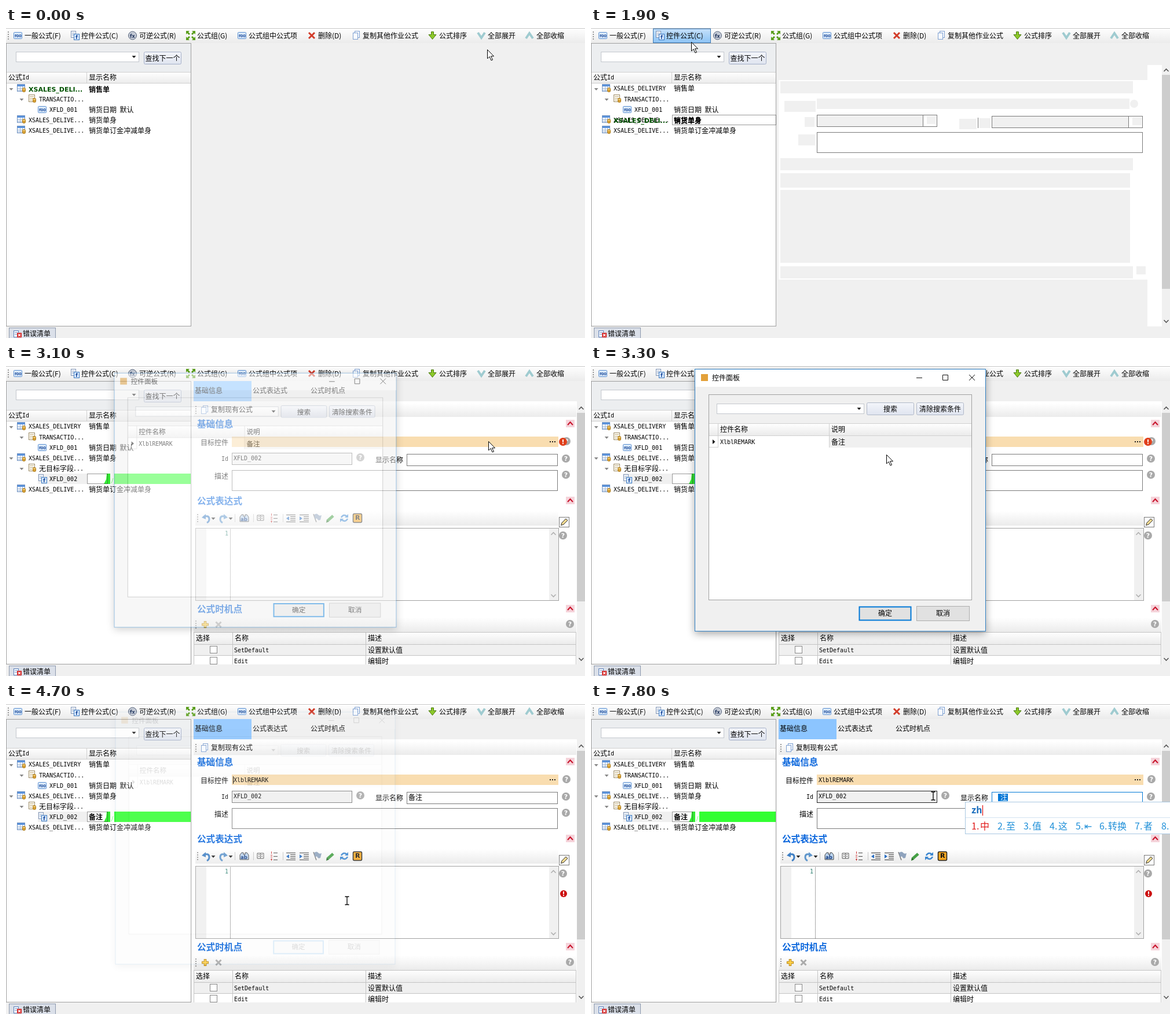
Animation of 1000 by 536 pixels, one loop 8 s. Source, as an HTML page:

```html
<!DOCTYPE html>
<html lang="zh-CN">
<head>
<meta charset="utf-8">
<title>公式编辑</title>
<style>
html, body { margin: 0; width: 100%; height: 100%; overflow: hidden; background: #f0f0f0; }
svg { display: block; width: 100%; height: 100%; }
text { font: 12px "Noto Sans CJK SC", "Noto Sans CJK", sans-serif; white-space: pre; }
.m { font: 10px "DejaVu Sans Mono", monospace; }
.b { font-weight: 700; }
.v { font: 700 11px "DejaVu Sans", sans-serif; }
.h { font-size: 15.6px; font-weight: 700; }
.ime { font-size: 16px; }
</style>
</head>
<body>
<svg id="stage" viewBox="0 0 1000 536" preserveAspectRatio="none" xmlns="http://www.w3.org/2000/svg"></svg>
<script>
const LOOP = 8000, STEP = 100;

// Drop from the middle line to the baseline, per text class
const drop = { m: 4, v: 4, h: 6, ime: 6, 'ime b': 5 };

// Drawing helpers: each returns SVG markup
const rect = (x, y, w, h, fill = 'none', line, extra = '') => line
  ? `<rect x="${x + .5}" y="${y + .5}" width="${w - 1}" height="${h - 1}" fill="${fill}" stroke="${line}" ${extra}/>`
  : `<rect x="${x}" y="${y}" width="${w}" height="${h}" fill="${fill}" ${extra}/>`;
const text = (x, mid, s, cls = '', fill = '#000', size = 0) =>
  `<text x="${x}" y="${Math.round(mid + (drop[cls] || 4.6))}" class="${cls}" fill="${fill}"${size ? ` style="font-size:${size}px"` : ''}>${s}</text>`;
const mono = (x, mid, s, fill) => text(x, mid, s, 'm', fill);
const path = (d, line, w = 1, fill = 'none', dash = 'none') =>
  `<path d="${d}" stroke="${line}" stroke-width="${w}" fill="${fill}" stroke-dasharray="${dash}"/>`;
const shape = (d, fill) => path(d, 'none', 0, fill);
const disc = (x, y, r, fill, line = 'none') =>
  `<circle cx="${x}" cy="${y}" r="${r}" fill="${fill}" stroke="${line}"/>`;
const at = (x, y, body) => `<g transform="translate(${x} ${y})">${body}</g>`;
const during = (from, to, body) => `<g data-from="${from}" data-to="${to}">${body}</g>`;
const dots = (x, y, w, h) => rect(x, y, w, h, 'none', '#333', 'stroke-dasharray="1 1"');
const down = (x, y, fill = '#222') => shape(`M${x - 3.5} ${y - 2}h7l-3.5 4z`, fill);
const grip = (x, y) => path(`M${x} ${y}v14`, '#999', 2, 'none', '2 2');
const sep = x => path(`M${x}.5 256v14`, '#c4c4c4');
const badge = (x, y, r, fill, mark) =>
  disc(x, y, r, fill) + `<text x="${x}" y="${y + 4}" text-anchor="middle" fill="#fff" class="v">${mark}</text>`;
const help = (x, y) => badge(x, y, 7, '#a9a9a9', '?');

// Icons
const fx = (x, y) => at(x, y, rect(0, 0, 15, 12, '#dcebfb', '#5b8fd0', 'rx="1"') + text(2, 5, 'f00', 'v', '#1f4e9c', 6.5));
const page = (x, y, line = '#7f94b5') => rect(x, y, 9, 12, '#f8fbff', line);
const pages = (x, y) => at(x, y, page(3, 0, '#7d9fd0') + page(0, 3, '#7d9fd0'));
const ctrl = (x, y) => at(x, y, page(0, 0) + path('M2 3.5h5M2 5.5h5M2 7.5h4', '#a8b8d0')
  + rect(5, 5, 10, 11, '#dcecff', '#3a78c0') + text(8, 10, 'f', 'v', '#17489a', 9));
const drum = (x, y) => rect(x, y, 6, 8, '#d9a236', '#a87616', 'rx="2"') + path(`M${x + 1} ${y + 2.5}h4`, '#ffe59a');
const table = (x, y) => at(x, y, rect(0, 0, 14, 13, '#fff', '#6c8fc0') + rect(1, 1, 12, 3, '#5b93dc')
  + path('M1 7.5h12M1 10.5h12M5.5 4v8M9.5 4v8', '#9db6d8') + drum(9, 6));
const list = (x, y) => at(x, y, rect(0, 0, 11, 13, '#fffdf4', '#9b8a66') + path('M2 3.5h7M2 6.5h7M2 9.5h4', '#c0ad82') + drum(7, 6));
const cross = (x, y, r, c) => path(`M${x - r} ${y - r}L${x + r} ${y + r}M${x + r} ${y - r}L${x - r} ${y + r}`, c, 3);
const arm = (x, y, sx, sy) => `<g transform="translate(${x} ${y}) scale(${sx} ${sy})">${shape('M0 0h6l-2 2 3 3-2 2-3-3-2 2z', '#5a9e1c')}</g>`;
const fold = y => rect(967, y - 6, 15, 13, '#f5d3da') + path(`M970 ${y + 3}l4.5-5 4.5 5`, '#c8142c', 2);

const defs = `<defs>
  <linearGradient id="bar" x2="0" y2="1"><stop stop-color="#fff"/><stop offset="1" stop-color="#ebebeb"/></linearGradient>
  <linearGradient id="btn" x2="0" y2="1"><stop stop-color="#f3f5fa"/><stop offset="1" stop-color="#dfe4ef"/></linearGradient>
  <linearGradient id="hot" x2="0" y2="1"><stop stop-color="#c5e0fa"/><stop offset="1" stop-color="#8cc3f5"/></linearGradient>
  <clipPath id="view"><path d="M0 0H1000V516H0z"/></clipPath></defs>`;
const bar = (x, y, w, h) => rect(x, y, w, h, 'url(#bar)');

function toolbar() {
  return bar(0, 0, 1000, 26) + path('M0 .5H1000', '#c6c6c6') + grip(4, 6)
    + during(1300, 2100, rect(107, 1, 100, 25, 'url(#hot)', '#3c78b4'))
    + fx(13, 7) + text(32, 13.5, '一般公式(F)')
    + ctrl(112, 5) + text(130, 13.5, '控件公式(C)')
    + disc(218.5, 13, 7, '#c5cbd6', '#55627a') + text(214, 13, 'fx', 'v', '#22355c', 8) + text(230, 13.5, '可逆公式(R)')
    + arm(311, 5, 1, 1) + arm(327, 5, -1, 1) + arm(311, 21, 1, -1) + arm(327, 21, -1, -1) + text(330, 13.5, '公式组(G)')
    + fx(400, 7) + text(419, 13.5, '公式组中公式项')
    + cross(528, 13, 5, '#d23c2a') + text(539, 13.5, '删除(D)')
    + pages(599, 5) + text(616, 13.5, '复制其他作业公式')
    + path('M734.5 6.5h4v5h4.5l-6.5 8-6.5-8h4.5z', '#4a7a10', 1, '#8cc82a') + text(748, 13.5, '公式排序')
    + path('M815 8l6 9 6-9', '#9fcbd0', 4) + text(832, 13.5, '全部展开')
    + path('M898 18l6-9 6 9', '#9fcbd0', 4) + text(916, 13.5, '全部收缩');
}

const row = (y, id, name, icon = table) => icon(19, y - 8) + mono(39, y, id) + text(143, y, name);
const boldId = (y, id, x = 39) => text(x, y, id, 'v', '#005200');

function tree() {
  const late = during(2000, LOOP,
    down(9, 160, '#888') + down(27, 178, '#888') + list(39, 169) + text(57, 177, '无目标字段') + mono(116, 177, '...')
    + during(2000, 2700, boldId(195, 'XFLD_002', 75) + dots(140, 186, 180, 18))
    + during(2700, LOOP, rect(55, 186, 85, 18, '#f0f0f0') + mono(75, 195, 'XFLD_002')
      + rect(187, 186, 132, 18, '#33ff33') + shape('M174 186h6v18h-11l4-8z', '#33ee33')
      + path('M182 203l3-9', '#8f8', 1) + dots(140, 186, 36, 18))
    + during(4600, LOOP, text(143, 195.5, '备注', 'b'))
    + ctrl(56, 187) + row(213, 'XSALES_DELIVE...', '销货单订金冲减单身'));
  return rect(0, 26, 320, 490, '#fff', '#a0a0a0') + rect(1, 27, 318, 49, '#eceef0')
    + rect(17, 41, 213, 18, '#fff', '#c3c7cd') + down(221, 50)
    + rect(238, 41, 65, 22, 'url(#btn)', '#a5b0c8', 'rx="2"') + text(240.5, 52, '查找下一个')
    + bar(1, 76, 318, 20) + path('M1 76.5H319M1 95.5H319M139.5 77V95', '#d0d0d0')
    + text(4, 85.5, '公式') + mono(28, 85, 'Id') + text(143, 85.5, '显示名称')
    + down(9, 106, '#888') + table(19, 97)
    + during(0, 900, boldId(106, 'XSALES_DELI...') + text(143, 106, '销售单', 'b'))
    + during(900, LOOP, mono(39, 104, 'XSALES_DELIVERY') + text(143, 104, '销售单'))
    + down(27, 124, '#888') + list(39, 115) + mono(57, 123, 'TRANSACTIO...')
    + fx(55, 135) + mono(75, 141, 'XFLD_001') + text(143, 141, '销货日期\u00a0\u00a0默认')
    + row(159, 'XSALES_DELIVE...', '销货单身')
    + during(900, 2000, boldId(160, 'XSALES_DELI...') + text(143, 160, '销货单身', 'b') + dots(140, 150, 180, 18))
    + during(0, 2000, row(177, 'XSALES_DELIVE...', '销货单订金冲减单身'))
    + late;
}

const footer = () => rect(5, 518, 81, 20, '#dbe0e9', '#8d99ad') + page(13, 523, '#5d7fb8')
  + path('M15 526.5h5M15 529.5h5', '#7fa0d0') + rect(19, 527, 8, 8, '#d42a2a') + path('M21 529l4 4m0-4l-4 4', '#fff', 1.3)
  + text(29, 528.5, '错误清单');

function scrollbar(end) {
  return rect(986, 64, 14, 452, '#f0f0f0') + rect(986, 81, 14, end - 81, '#cdcdcd')
    + path('M989.5 75l4-4 4 4M989.5 505l4 4 4-4', '#555', 1.6);
}

function skeleton() {
  const grey = [[327, 92, 609, 21], [334, 126, 54, 19], [390, 122, 540, 18], [369, 154, 17, 17], [636, 157, 30, 18],
    [358, 184, 29, 19], [327, 225, 609, 21], [327, 251, 604, 25], [327, 280, 604, 126], [327, 412, 609, 21], [942, 412, 16, 14]];
  const box = (x, y, w, cut) => rect(x, y, w, 21, '#fff', '#7a7a7a') + rect(x + 1, y + 1, cut - x - 1, 19, '#f0f0f0')
    + path(`M${cut}.5 ${y}v20`, '#7a7a7a') + rect(cut + 7, y + 2, 16, 14, '#f0f0f0');
  return rect(324, 90, 637, 345, '#fff') + rect(961, 64, 25, 452, '#fff')
    + grey.map(g => rect(...g, '#f0f0f0')).join('') + disc(938, 131, 7, '#f0f0f0')
    + box(390, 150, 208, 573) + box(692, 152, 261, 928) + path('M668.5 155v18', '#7a7a7a') + rect(670, 156, 20, 17, '#f0f0f0')
    + rect(390, 180, 563, 36, '#fff', '#7a7a7a') + scrollbar(451);
}

function editorBar() {
  const lines = (x, flip) => path(`M${x} 257.5h16M${x + 7} 260.5h9M${x + 7} 263.5h9M${x + 7} 266.5h9M${x} 269.5h16`, '#333')
    + shape(flip ? `M${x} 260l5 3.5-5 3.5z` : `M${x + 5} 260l-5 3.5 5 3.5z`, '#2a6fc4');
  return bar(327, 251, 627, 25) + grip(331, 256)
    + path('M341 261q10-4 10 4 0 4-4 6', '#3f7fc4', 3) + shape('M338 262l7-6v9z', '#3f7fc4') + down(358, 264)
    + path('M380 261q-10-4-10 4 0 4 4 6', '#5f96cc', 3) + shape('M383 262l-7-6v9z', '#5f96cc') + down(388, 264) + sep(395)
    + path('M404 269v-8l3-4h3v3h3v-3h3l3 4v8z', '#444', 1, '#bcd4ee') + text(405, 264, 'ab', 'v', '#123a80', 8.5) + sep(427)
    + path('M434 258h5.5v9H434zM439.5 258h5.5v9h-5.5zM436 260.5h2M436 263.5h2M441 260.5h2M441 263.5h2', '#555')
    + path('M462 257.5h7M462 263.5h7M462 269.5h7', '#444')
    + path('M458.5 255v4M457 261.5h3M457 264.5h3M457 268.5h3M458.5 267v4', '#c33') + sep(478)
    + lines(484) + lines(507, true)
    + path('M531 256l5 14', '#777', 1.5) + shape('M532 257q5-3 7 0t6 1l-2 8q-4 2-5-1t-4 0z', '#8fa3bd')
    + path('M556 267l9-8', '#45a045', 5) + shape('M553 271l1-6 4 4z', '#267026')
    + path('M579 262q4-7 10-2M590 264q-4 7-10 2', '#3b86d0', 2.5) + shape('M591 256v6h-6zM577 270v-6h6z', '#3b86d0')
    + rect(599, 255, 16, 16, '#f5a623', '#222', 'rx="2" stroke-width="1.5"') + text(603, 262, 'R', 'v', '#111', 11);
}

function form() {
  const blue = '#0a66dc';
  const select = x => rect(x, 155, 720 - x, 13, '#0078d7') + text(707, 161, '注', '', '#fff');
  const tick = y => rect(352, y, 13, 13, '#fff', '#888');
  const edge = (x, y, w, h, c) => rect(x, y, w, h, 'none', c);
  return rect(321, 61, 665, 455, '#fff') + rect(321, 26, 679, 35, '#f0f0f0') + rect(324, 26, 100, 35, '#8cc5ff')
    + text(326, 42, '基础信息') + text(426, 42, '公式表达式') + text(526, 42, '公式时机点')
    + bar(324, 65, 661, 23) + grip(328, 69) + pages(337, 68) + text(354, 75.5, '复制现有公式')
    + text(330, 100, '基础信息', 'h', blue) + fold(99)
    + text(336, 132, '目标控件') + rect(390, 122, 564, 18, '#f9ddb0')
    + [939, 943, 947].map(x => rect(x, 130, 2, 2, '#222')).join('') + help(968, 130)
    + during(2000, 4600, badge(962, 131, 7, '#e0401c', '!'))
    + during(4600, LOOP, mono(393, 131, 'XlblREMARK')) + during(4600, 5000, path('M392.5 125v13', '#000'))
    + mono(372, 160, 'Id') + rect(390, 150, 208, 21, '#f0f0f0', '#7a7a7a') + during(5900, LOOP, edge(390, 150, 208, 21, '#222'))
    + mono(393, 159, 'XFLD_002') + help(612, 158)
    + text(638, 162, '显示名称') + rect(692, 152, 261, 21, '#fff', '#7a7a7a') + help(967, 160)
    + during(4600, 7500, text(695, 161, '备注'))
    + during(5300, LOOP, edge(692, 152, 261, 21, '#0078d7'))
    + during(5400, 5500, select(707)) + during(5500, 7500, select(695) + text(695, 161, '备', '', '#fff')) + during(7500, LOOP, select(703))
    + [[6300, 6700], [7200, 7500]].map(([a, b]) => during(a, b, path('M695.5 155v13', '#ff8728'))).join('')
    + text(360, 190, '描述') + rect(390, 180, 563, 36, '#fff', '#7a7a7a') + help(967, 188)
    + text(330, 233, '公式表达式', 'h', blue) + fold(232) + editorBar()
    + rect(327, 280, 628, 126, '#fff', '#a0a0a0') + rect(328, 281, 18, 124, '#f0f0f0') + rect(938, 281, 16, 124, '#f0f0f0')
    + mono(378, 289, '1', '#2b7f6f') + path('M387.5 282V405', '#555', 1, 'none', '1 1')
    + path('M941.5 292l4-4 4 4M941.5 395l4 4 4-4', '#b0b0b0', 1.6)
    + rect(955, 261, 18, 18, '#fff', '#777') + path('M958.5 275.5l1.5-4.5 7-7 3 3-7 7z', '#333', 1, '#f0d890') + help(962, 293)
    + during(2000, 2800, badge(963, 328, 6, '#cc1010', '!')) + during(3400, LOOP, badge(963, 328, 6, '#cc1010', '!'))
    + text(330, 420, '公式时机点', 'h', blue) + fold(419)
    + bar(324, 435, 661, 25) + grip(328, 440) + path('M344 441v12M338 447h12', '#b88414', 4.5) + path('M344 442v10M339 447h10', '#ffd34a', 2.5)
    + cross(367, 447, 4.5, '#aaa') + help(974, 446)
    + bar(324, 460, 661, 21) + rect(324, 482, 661, 18, '#f0f0f0')
    + path('M324 460.5H985M324 481.5H985M324 500.5H985M391.5 460V516M621.5 460V516M324.5 460V516M984.5 460V516', '#c4c4c4')
    + text(328, 470, '选择') + text(395, 470, '名称') + text(625, 470, '描述')
    + tick(484) + mono(394, 491, 'SetDefault') + text(625, 491, '设置默认值')
    + tick(503) + mono(394, 510, 'Edit') + text(625, 510, '编辑时') + scrollbar(407);
}

function dialog() {
  const button = (x, y, w, h, label, lx) => rect(x, y, w, h, 'url(#btn)', '#b0b8c8', 'rx="2"') + text(lx, y + 11, label);
  return `<g id="dialog"><g style="filter:drop-shadow(0 4px 7px rgba(0,0,0,.35))">${rect(179, 5, 503, 454, '#f0f0f0', '#2f80c4')}</g>`
    + rect(180, 6, 501, 30, '#fff') + rect(190, 14, 12, 12, '#e3a13a') + text(209, 20, '控件面板')
    + path('M562 20.5h10M607.5 15.5h9v9h-9zM653 15l10 10M663 15l-10 10', '#111')
    + rect(203, 49, 455, 356, '#fff', '#a0a0a0') + rect(204, 50, 453, 49, '#f0f0f0')
    + rect(217, 65, 255, 18, '#fff', '#c3c7cd') + down(463, 74)
    + button(476, 63, 82, 22, '搜索', 505) + button(562, 63, 82, 22, '清除搜索条件', 567)
    + bar(204, 99, 453, 21) + path('M204 99.5H657M204 120.5H657M219.5 99V141M411.5 99V141M204 140.5H219', '#d0d0d0')
    + text(223, 109, '控件名称') + text(415, 109, '说明')
    + shape('M210 127l4.5 4-4.5 4z', '#111') + mono(223, 131, 'XlblREMARK') + rect(412, 121, 245, 20, '#f0f0f0') + text(415, 131, '备注')
    + rect(463, 416, 90, 24, '#e1e1e1', '#0078d7', 'stroke-width="2"') + text(496, 427.5, '确定')
    + rect(562, 415, 92, 26, '#e1e1e1', '#adadad') + text(596, 427.5, '取消') + '</g>';
}

function ime(x, typed, words) {
  const left = x + 11, starts = [0, 45, 90, 135, 180, 221, 282, 328];
  const word = (w, i) => {
    const color = i ? '#1e8fd8' : '#e01818';
    return text(left + starts[i], 211, `${i + 1}.`, 'ime', color) + text(left + starts[i] + 15, 211, w, 'ime', color);
  };
  return rect(x, 169, 1010 - x, 56, '#fff', '#a9c8e2') + path(`M${x + 1} 196.5H1000`, '#d3e3f0')
    + text(left, 184, typed, 'ime b', '#1c6fbe') + path(`M${left + typed.length * 9.5 + .5} 175v18`, '#e01010', 1.2)
    + words.map(word).join('');
}

const stage = document.getElementById('stage');
stage.innerHTML = defs + rect(0, 0, 1000, 536, '#f0f0f0') + toolbar() + tree() + footer()
  + `<g clip-path="url(#view)">${during(1800, 2000, skeleton())}${during(2000, LOOP, form())}</g>`
  + dialog()
  + during(7500, 7800, ime(678, 'z', ['在', '中', '至', '值', '这', '转换', '者', '']))
  + during(7800, LOOP, ime(646, 'zh', ['中', '至', '值', '这', '⇤', '转换', '者', '']))
  + `<g id="arrow">${path('M.5 .5V16L4 12.5L7 19L9.5 18L6.5 11.8H11.5Z', '#000', 1, '#fff')}</g>`
  + `<g id="beam">${path('M-3.5-7H-1L0-6L1-7H3.5M0-6V6M-3.5 7H-1L0 6L1 7H3.5', '#000', 1.3)}</g>`;

// Pointer: time, x, y
const route = [[0, 831, 37], [900, 155, 163], [1000, 157, 158], [1400, 173, 24], [1900, 173, 24], [2600, 946, 122], [3000, 946, 122],
  [3300, 510, 153], [3600, 440, 134], [3900, 440, 134], [4300, 508, 428], [4500, 508, 428], [4700, 589, 340], [4800, 604, 266],
  [5200, 722, 161], [5300, 722, 161], [5700, 591, 159]];
// Dialog: time, scale, opacity
const fade = [[0, 1, 0], [3100, .97, .5], [3200, 1, 1], [4600, .98, .5], [4700, .962, .13], [4800, 1, 0]];

function pointer(t) {
  const i = route.findIndex(k => k[0] > t);
  if (i < 0) return route[route.length - 1].slice(1);
  const [a, b] = [route[i - 1], route[i]];
  const p = (t - a[0]) / (b[0] - a[0]), e = p * p * (3 - 2 * p);
  return [a[1] + (b[1] - a[1]) * e, a[2] + (b[2] - a[2]) * e];
}

const timed = [...stage.querySelectorAll('[data-from]')].map(g => [g, +g.dataset.from, +g.dataset.to]);
const [box, arrow, beam] = ['dialog', 'arrow', 'beam'].map(id => document.getElementById(id));
const show = (g, on) => { g.style.display = on ? '' : 'none'; };

function draw(t) {
  for (const [g, from, to] of timed) show(g, t >= from && t < to);
  const [, s, o] = fade.filter(k => k[0] <= t).pop();
  show(box, o);
  box.style.opacity = o;
  box.setAttribute('transform', `translate(430.5 233) scale(${s}) translate(-430.5 -233)`);
  const [x, y] = pointer(t).map(Math.round);
  const typing = t >= 4700;
  show(arrow, !typing);
  show(beam, typing);
  (typing ? beam : arrow).setAttribute('transform', `translate(${x} ${y})`);
}

const start = performance.now();
function frame() {
  const t = (performance.now() - start) % LOOP;
  draw(Math.floor(t / STEP) * STEP);
  requestAnimationFrame(frame);
}
draw(0);
requestAnimationFrame(frame);
</script>
</body>
</html>
```
